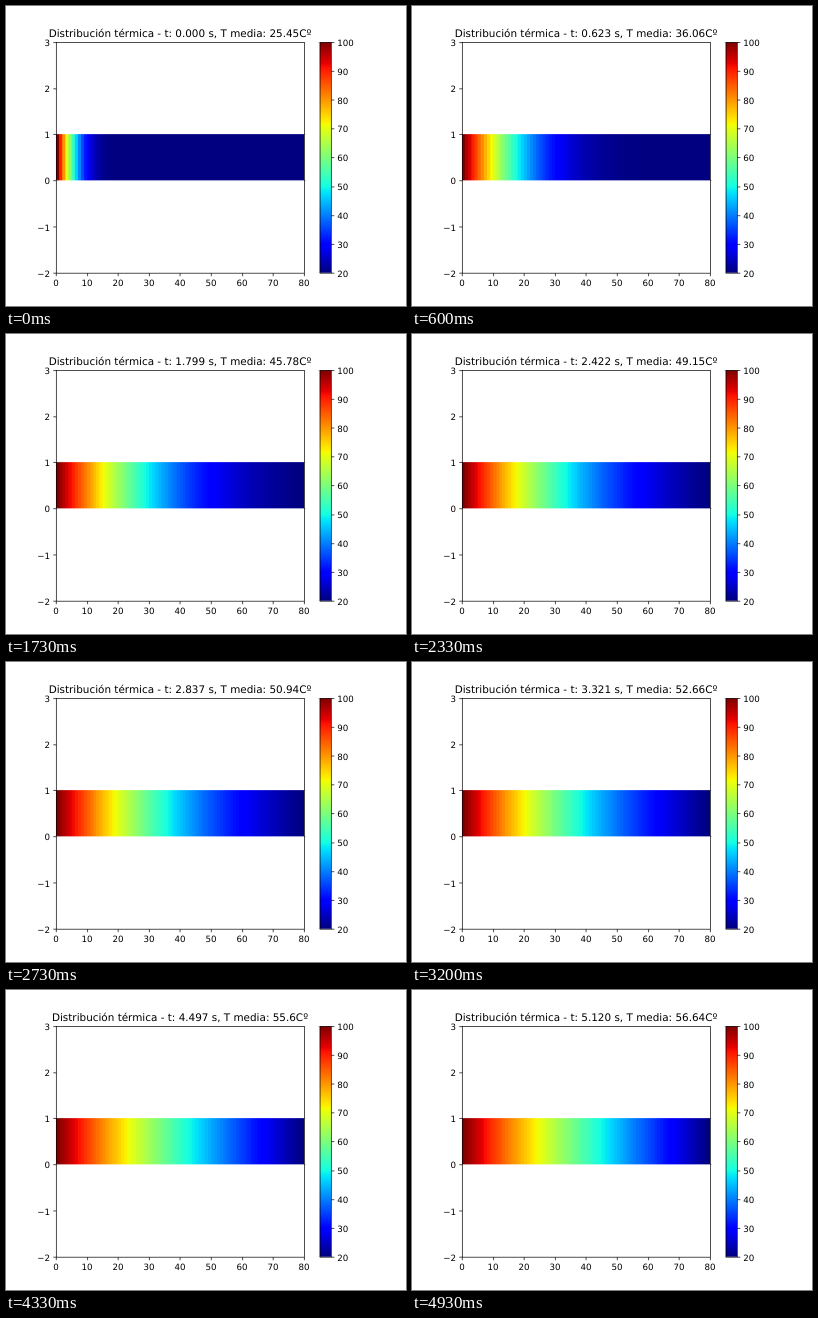
Write an HTML page with a canvas that moves like this. It is 400 by 300 pixels and loops after 5 s.

```html
<!DOCTYPE html>
<html lang="es">
<head>
<meta charset="utf-8">
<title>Distribución térmica</title>
<style>
  html, body { margin: 0; width: 100%; height: 100%; overflow: hidden; background: #fff; }
  canvas { display: block; width: 100vw; height: 100vh; }
</style>
</head>
<body>
<canvas id="plot" width="400" height="300"></canvas>
<script>
const ctx = document.getElementById('plot').getContext('2d');
const FONT = '"DejaVu Sans", sans-serif';

// Layout on a 640 x 480 figure, scaled down to the stage.
const SCALE = 0.625;
const AX = { left: 80, right: 476.8, top: 57.6, bottom: 427.2 };
const BAR = { left: 501.6, right: 520.08 };
const TICK = 4.86, GAP = 9.72, SIZE = 13.89, TITLE_SIZE = 16.667;
const ASCENT = 11;

const LOOP = 5000, FRAMES = 75, FRAME_DT = 0.06919;
const NODES = 80, STEPS = 76, RATE = 0.25002, FIRST_RATE = RATE / 4;
const T_MIN = 20, T_MAX = 100;

const xPix = x => AX.left + x / 80 * (AX.right - AX.left);
const yPix = y => AX.bottom - (y + 2) / 5 * (AX.bottom - AX.top);
const tempPix = t => AX.bottom - (t - T_MIN) / (T_MAX - T_MIN) * (AX.bottom - AX.top);
const snap = v => Math.floor(v + 0.5) + 0.5;

// Piecewise linear colour channels of the jet palette.
const RED = [[0, 0], [0.35, 0], [0.66, 1], [0.89, 1], [1, 0.5]];
const GREEN = [[0, 0], [0.125, 0], [0.375, 1], [0.64, 1], [0.91, 0], [1, 0]];
const BLUE = [[0, 0.5], [0.11, 1], [0.34, 1], [0.65, 0], [1, 0]];

function channel(points, v) {
  const i = Math.max(1, points.findIndex(p => p[0] >= v));
  const [x0, y0] = points[i - 1], [x1, y1] = points[i];
  return Math.round(255 * (y0 + (y1 - y0) * (v - x0) / (x1 - x0)));
}

const palette = Array.from({ length: 256 }, (_, i) =>
  `rgb(${[RED, GREEN, BLUE].map(c => channel(c, i / 255)).join(',')})`);

function tempColor(t) {
  const i = Math.floor((t - T_MIN) / (T_MAX - T_MIN) * 256);
  return palette[Math.min(255, Math.max(0, i))];
}

// One explicit step of the heat equation; both ends keep their temperature.
function diffuse(u, rate) {
  return u.map((t, i) => i === 0 || i === NODES - 1
    ? t : t + rate * (u[i - 1] - 2 * t + u[i + 1]));
}

function simulate() {
  let u = new Float64Array(NODES).fill(T_MIN);
  u[0] = T_MAX;
  u = diffuse(u, FIRST_RATE);
  return Array.from({ length: FRAMES }, () => {
    for (let s = 0; s < STEPS; s++) u = diffuse(u, RATE);
    return u;
  });
}

const states = simulate();

function line(x0, y0, x1, y1) {
  ctx.beginPath();
  ctx.moveTo(x0, y0);
  ctx.lineTo(x1, y1);
  ctx.stroke();
}

function box(left, right) {
  const x = snap(left), y = snap(AX.top);
  ctx.strokeRect(x, y, snap(right) - x, snap(AX.bottom) - y);
}

// A minute tilt lets glyphs sit between pixel rows.
function label(text, x, y, align, size = SIZE) {
  ctx.save();
  ctx.translate(x, y);
  ctx.rotate(1e-4);
  ctx.font = `${size}px ${FONT}`;
  ctx.textRendering = 'geometricPrecision';
  ctx.textAlign = align;
  ctx.fillText(text, 0, 0);
  ctx.restore();
}

// Whitens a margin around a box, leaving evenly blended edges.
function trim(left, top, right, bottom) {
  const m = 6, w = right - left + 2 * m, h = bottom - top;
  ctx.fillStyle = '#fff';
  ctx.fillRect(left - m, top - m, w, m);
  ctx.fillRect(left - m, bottom, w, m);
  ctx.fillRect(left - m, top, m, h);
  ctx.fillRect(right, top, m, h);
}

// Cells overlap up to the far end so that no seams show.
function drawRod(u) {
  const left = Math.round(AX.left), right = Math.round(AX.right);
  const top = Math.round(yPix(1)), bottom = Math.round(yPix(0));
  u.forEach((t, i) => {
    const x = Math.round(xPix(i));
    ctx.fillStyle = tempColor(t);
    ctx.fillRect(x, top - 2, right + 2 - x, bottom - top + 4);
  });
  trim(left, top, right, bottom);
}

function drawColorbar() {
  const left = Math.round(BAR.left), right = Math.round(BAR.right);
  const top = Math.round(AX.top), bottom = Math.round(AX.bottom);
  palette.forEach((color, i) => {
    const y = bottom - (bottom - top) * i / 256;
    ctx.fillStyle = color;
    ctx.fillRect(left - 2, top - 2, right - left + 4, y - top + 2);
  });
  trim(left, top, right, bottom);
}

function drawAxes() {
  ctx.fillStyle = ctx.strokeStyle = '#000';
  ctx.lineWidth = 1.11;
  box(AX.left, AX.right);
  box(BAR.left, BAR.right);
  const drop = (ASCENT + 1) / 2;
  for (let v = 0; v <= 80; v += 10) {
    const x = snap(xPix(v)), y = snap(AX.bottom);
    line(x, y, x, y + TICK);
    label(v, xPix(v), AX.bottom + GAP + ASCENT, 'center');
  }
  for (let v = -2; v <= 3; v++) {
    const x = snap(AX.left), y = snap(yPix(v));
    line(x - TICK, y, x, y);
    label(String(v).replace('-', '\u2212'), AX.left - GAP, yPix(v) + drop, 'right');
  }
  for (let t = T_MIN; t <= T_MAX; t += 10) {
    const x = snap(BAR.right), y = snap(tempPix(t));
    line(x, y, x + TICK, y);
    label(t, BAR.right + GAP, tempPix(t) + drop, 'left');
  }
}

function draw(frame) {
  const u = states[frame];
  const mean = u.reduce((a, b) => a + b) / NODES;
  const time = (frame * FRAME_DT).toFixed(3);
  ctx.setTransform(SCALE, 0, 0, SCALE, 0, 0);
  ctx.fillStyle = '#fff';
  ctx.fillRect(0, 0, 640, 480);
  drawRod(u);
  drawColorbar();
  drawAxes();
  label(`Distribución térmica - t: ${time} s, T media: ${Number(mean.toFixed(2))}Cº`,
    (AX.left + AX.right) / 2, AX.top - 8, 'center', TITLE_SIZE);
}

// Three frames every 200 ms: 70, 60 and 70 ms long.
function frameAt(ms) {
  const r = ms % 200;
  return Math.floor(ms / 200) * 3 + (r >= 70) + (r >= 130);
}

let shown = -1;
const start = performance.now();

function tick() {
  const frame = frameAt((performance.now() - start) % LOOP);
  if (frame !== shown) draw(shown = frame);
  requestAnimationFrame(tick);
}

tick();
</script>
</body>
</html>
```
